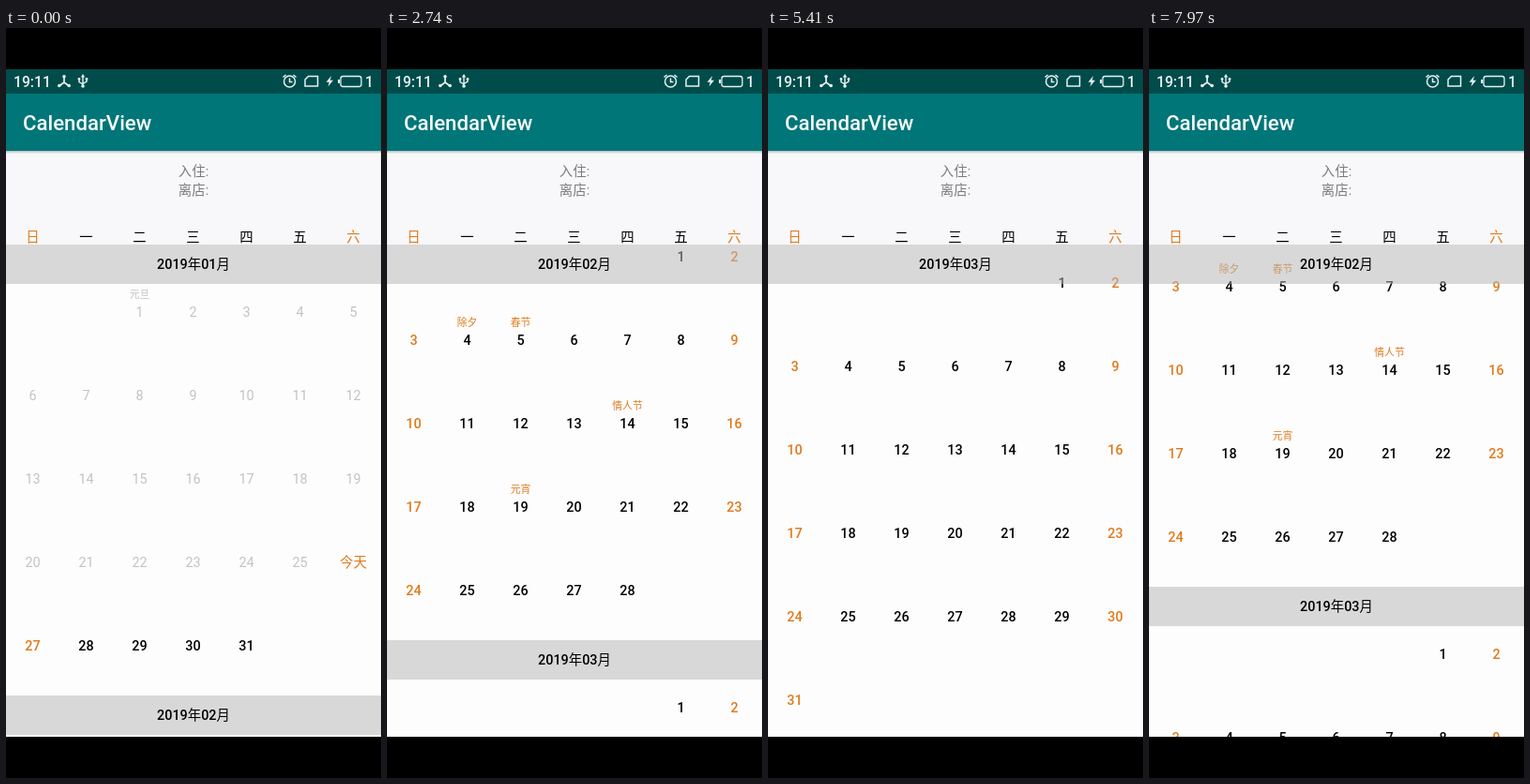
Recreate the animation shown at these times as an HTML page with a canvas. Size 400 by 800 pixels, loop 8 s.

```html
<!DOCTYPE html>
<html lang="zh">
<head>
<meta charset="utf-8">
<title>CalendarView</title>
<style>
html, body { margin: 0; width: 100%; height: 100%; overflow: hidden; background: #000; }
canvas { display: block; width: 400px; height: 800px; }
</style>
</head>
<body>
<canvas id="stage" width="400" height="800"></canvas>
<script>
const ctx = document.getElementById('stage').getContext('2d');
const FONT = 'Roboto, "Noto Sans CJK SC", "Noto Sans CJK", sans-serif';
const LOOP = 8000, LIST_TOP = 231, LIST_BOTTOM = 756, HEADER = 42, ROW = 89;
const ORANGE = '#e07a1c', BLACK = '#000', PAST = '#c3c3c6', GRAY = '#7c7c7c', ICON = '#e8f1f1';

const months = [
  { name: '2019年01月', days: 31, start: 2, past: 25, notes: { 1: '元旦' } },
  { name: '2019年02月', days: 28, start: 5, past: 0, notes: { 4: '除夕', 5: '春节', 14: '情人节', 19: '元宵' } },
  { name: '2019年03月', days: 31, start: 5, past: 0, notes: {} },
  { name: '2019年04月', days: 30, start: 1, past: 0, notes: {} }
];
let contentTop = 0;
for (const m of months) {
  m.top = contentTop;
  contentTop += 36 + ROW * Math.ceil((m.start + m.days) / 7);
}

// Scroll keys: time in ms, offset in px
const keys = [[500, 0], [1300, 289], [2000, 420], [2180, 420], [2740, 540], [3580, 760.5],
  [5410, 993], [6270, 1040], [6430, 1040], [6810, 971], [7970, 597], [8000, 588]];
const slope = i => (keys[i + 1][1] - keys[i][1]) / (keys[i + 1][0] - keys[i][0]);

function tangent(i) {
  if (i === 0) return 0;
  if (i === keys.length - 1) return slope(i - 1);
  const a = slope(i - 1), b = slope(i);
  return a * b > 0 ? 2 * a * b / (a + b) : 0;
}

// Monotone cubic interpolation through the keys
function scrollAt(t) {
  if (t <= keys[0][0]) return 0;
  let i = 0;
  while (i < keys.length - 2 && t > keys[i + 1][0]) i++;
  const [t0, y0] = keys[i], [t1, y1] = keys[i + 1];
  const span = t1 - t0, u = (t - t0) / span, v = 1 - u;
  return y0 * v * v * (1 + 2 * u) + y1 * u * u * (3 - 2 * u)
    + span * u * v * (tangent(i) * v - tangent(i + 1) * u);
}

function rect(x, y, w, h, color) {
  ctx.fillStyle = color;
  ctx.fillRect(x, y, w, h);
}

function text(s, x, y, color, { size = 14.4, align = 'center', weight = 400 } = {}) {
  ctx.font = `${weight} ${size}px ${FONT}`;
  ctx.textAlign = align;
  ctx.fillStyle = color;
  ctx.fillText(s, x, y);
}

function stroke(path, width = 1.5) {
  ctx.strokeStyle = ICON;
  ctx.lineWidth = width;
  ctx.stroke(new Path2D(path));
}

function fill(path) {
  ctx.fillStyle = ICON;
  ctx.fill(new Path2D(path));
}

function dot(x, y, r) {
  ctx.fillStyle = ICON;
  ctx.beginPath();
  ctx.arc(x, y, r, 0, Math.PI * 2);
  ctx.fill();
}

const columnX = col => 28.5 + 57 * col;
const isWeekend = col => col === 0 || col === 6;

function drawStatusBar() {
  rect(0, 44, 400, 26, '#004c4b');
  text('19:11', 8, 62.5, ICON, { size: 15.7, align: 'left', weight: 500 });
  stroke('M62 51V58L56.5 62M62 58L67.5 62', 1.7);
  dot(62, 51.8, 1.8); dot(56.8, 61.5, 1.8); dot(67.2, 61.5, 1.8);
  stroke('M82 51V62M78 54.5V57.5L82 60M86 54V57L82 59.5', 1.4);
  fill('M82 49L84.2 52.5H79.8Z');
  dot(82, 62, 1.8); dot(78, 54.5, 1.4); dot(86, 54.5, 1.4);
  stroke('M296.5 57A6 6 0 1 0 308.5 57A6 6 0 1 0 296.5 57M302.5 53.5V57.5H305.5M295.5 52.5L298.5 50M309.5 52.5L306.5 50');
  stroke('M322.5 51.5H332.5V62H319V55Z');
  fill('M347 51L341.5 57.7H344.7L343.5 62.5L349 55.7H345.7Z');
  stroke('M359.5 51.5H376.5Q379 51.5 379 54V60Q379 62.5 376.5 62.5H359.5Q357 62.5 357 60V54Q357 51.5 359.5 51.5Z', 1.3);
  rect(354, 55, 2, 4, ICON);
  text('1', 387.5, 62.5, ICON, { size: 15.7, weight: 500 });
}

function drawTop() {
  rect(0, 44, 400, 712, '#fdfdfd');
  rect(0, 131, 400, 100, '#f8f8fa');
  const shadow = ctx.createLinearGradient(0, 131, 0, 134);
  shadow.addColorStop(0, 'rgba(0,50,50,.3)');
  shadow.addColorStop(1, 'rgba(0,50,50,0)');
  rect(0, 131, 400, 3, shadow);
  rect(0, 70, 400, 61, '#007678');
  drawStatusBar();
  text('CalendarView', 18, 108.5, '#f6fafa', { size: 22.2, align: 'left', weight: 500 });
  text('入住:', 200, 158, GRAY);
  text('离店:', 200, 177.5, GRAY);
  [...'日一二三四五六'].forEach((day, col) =>
    text(day, columnX(col), 227.5, isWeekend(col) ? ORANGE : BLACK, { weight: 500 }));
}

function drawDays(month, y) {
  for (let day = 1; day <= month.days; day++) {
    const cell = month.start + day - 1, col = cell % 7;
    const center = y + 72 + ROW * Math.floor(cell / 7);
    if (center < LIST_TOP - 20 || center > LIST_BOTTOM + 40) continue;
    const past = day <= month.past, today = day === month.past + 1 && month.past > 0;
    const color = past ? PAST : isWeekend(col) ? ORANGE : BLACK;
    const weight = past ? 400 : 500;
    text(today ? '今天' : day, columnX(col), center + 5.2, color, { weight });
    const note = month.notes[day];
    if (note) text(note, columnX(col), center - 15.5, past ? PAST : ORANGE, { size: 10.8, weight });
  }
}

function drawHeader(month, y, color) {
  rect(0, y, 400, HEADER, color);
  text(month.name, 200, y + 26.3, BLACK, { weight: 500 });
}

function draw(t) {
  const scroll = scrollAt(t);
  rect(0, 0, 400, 800, '#000');
  drawTop();
  ctx.save();
  ctx.beginPath();
  ctx.rect(0, LIST_TOP, 400, LIST_BOTTOM - LIST_TOP);
  ctx.clip();
  const screenY = m => Math.round(LIST_TOP + m.top - scroll);
  const upcoming = months.findIndex(m => m.top > scroll);
  months.forEach(m => drawDays(m, screenY(m)));
  months.slice(upcoming).forEach(m => drawHeader(m, screenY(m), '#d8d8d8'));
  // The pinned month is pushed out by the next one
  const pinnedY = Math.min(LIST_TOP, screenY(months[upcoming]) - HEADER);
  drawHeader(months[upcoming - 1], pinnedY, 'rgba(182,182,182,.52)');
  ctx.restore();
}

const startTime = performance.now();
function frame() {
  draw((performance.now() - startTime) % LOOP);
  requestAnimationFrame(frame);
}
frame();
</script>
</body>
</html>
```
